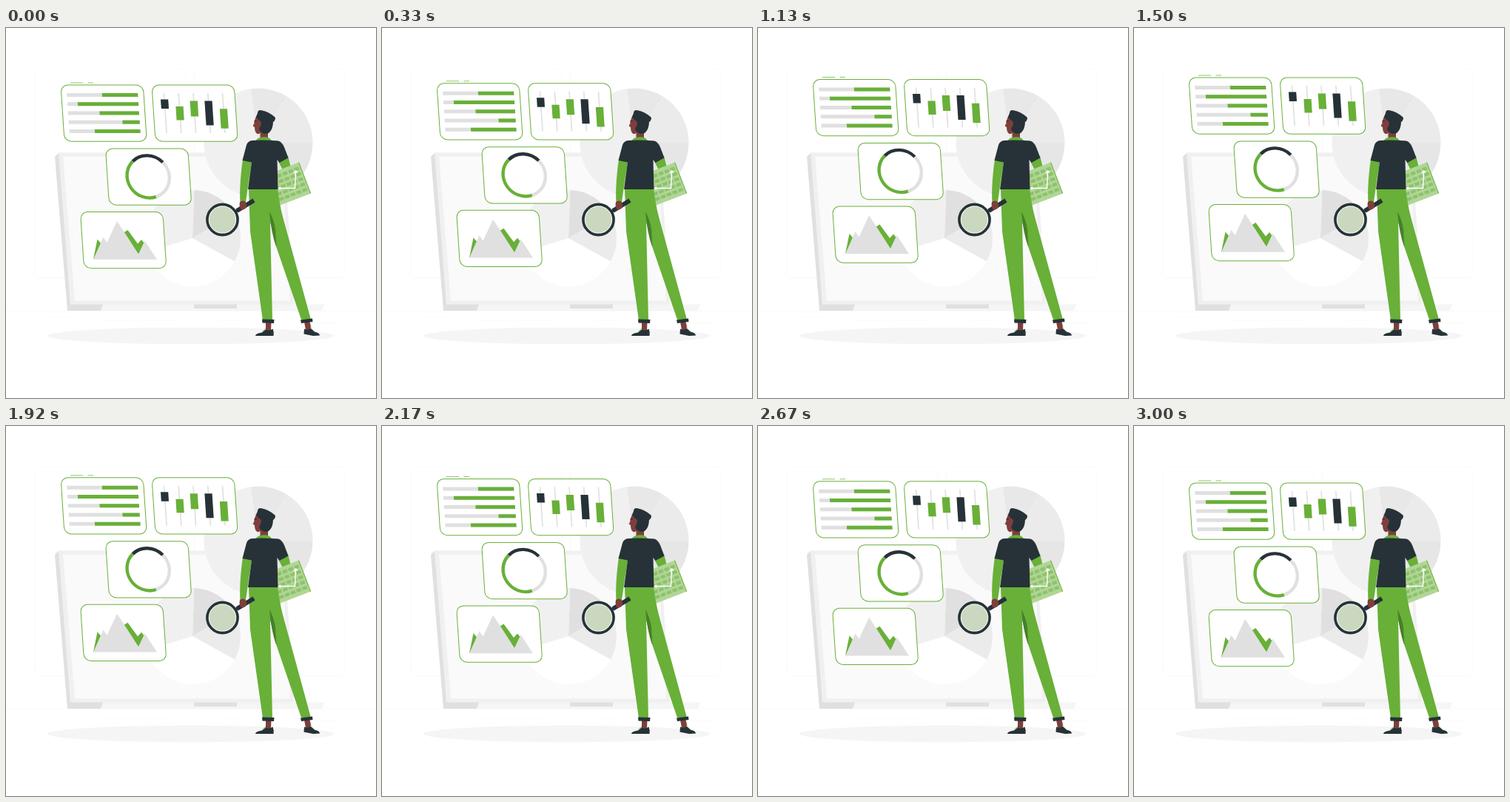
Animation of 500x500 px, one loop 3040 ms. Source, as an HTML page:

```html
<!DOCTYPE html>
<html lang="en">
<head>
<meta charset="utf-8">
<title>Data dashboard</title>
<style>
html, body { margin: 0; width: 100%; height: 100%; overflow: hidden; background: #fff }
svg { display: block; width: 100%; height: 100% }
.green { fill: #68b038 } .dark { fill: #263238 } .skin { fill: #7f3e3b }
.grey { fill: #e0e0e0 } .pale { fill: #f0f0f0 } .light { fill: #fafafa }
.line { fill: none; stroke: #ebebeb; stroke-width: .25 }
.card { fill: #fff; stroke: #68b038 }
.ring { fill: none; stroke-width: 4.4 }
</style>
</head>
<body>
<svg viewBox="0 0 500 500">
  <g class="line">
    <rect x="38.7" y="55.2" width="204" height="282.4" rx="5.7"/>
    <rect x="254.5" y="55.2" width="204" height="282.4" rx="5.7"/>
    <path d="M0 382.5H500M417 398.6H450M397 389.3H416M52 391H95.6M104.6 391H111M131.5 395.3H225M290 395.3H325"/>
  </g>

  <!-- Laptop -->
  <path class="grey" d="M66 174L72 168L89 374L83 382Z"/>
  <path class="pale" d="M71 168.5H376L389 374H87Z"/>
  <path class="light" d="M77 173.5H372L384 368.5H93Z"/>
  <path fill="#f5f5f5" d="M131 373.5H430L427 382H128Z"/>
  <path class="grey" d="M87 373.5H131L128 382H83ZM254 373.5H312V379H256Q254 379 254 377Z"/>
  <g id="pies"></g>
  <ellipse cx="249.5" cy="416" rx="193.9" ry="11.3" fill="#f5f5f5"/>

  <!-- Floating cards -->
  <g id="float">
    <path stroke="#68b038" stroke-width="1.1" opacity=".75" d="M87 74H104M110.5 74H118"/>
    <g id="bars" transform="translate(74 77) skewX(3.76)"></g>
    <g id="candles" transform="translate(197 77) skewX(3.76)"></g>
    <g id="donut" transform="translate(134.5 163) skewX(3.76)"></g>
    <g id="peaks" transform="translate(100.5 248.5) skewX(3.76)"></g>
    <path class="green" d="M118 312.5L123.5 285.5L136 300ZM158 277L164.5 273L178 291.5L183 286L188 292L179 306Z"/>
    <path class="grey" d="M118 312.8L131.5 282.5L136.5 290L150 261L161 277.5L179 305.5L187.5 287.5L204 312.8Z"/>
  </g>

  <!-- Tablet under the arm -->
  <path class="green" d="M368 180L381 173L384.5 187L375 194Z"/>
  <g transform="translate(396 181.5) rotate(-21)">
    <rect x="-48" width="48" height="45" fill="#b0d696"/>
    <g id="cells" fill="#8ec26c"></g>
    <path class="green" d="M-1 0H0V45H-1Z"/>
  </g>
  <path d="M367 217L371 215.5M369 216.5L390.5 216.5L391.5 194M389 196L391.5 193L394 195" fill="none" stroke="#fff" stroke-width="1.4"/>
  <circle cx="370" cy="217" r="1.6" fill="#fff"/>
  <circle cx="391.5" cy="194" r="1.6" fill="#fff"/>

  <!-- Shoes and trousers -->
  <path class="skin" d="M351 397H358.5L358 409H351ZM403 397H410.5L413 408H405Z"/>
  <path fill="#b0d696" d="M345 411L351 405V410ZM411 404L417 410L412 409Z"/>
  <path class="dark" d="M337 416Q337 412.5 346 411.5L351 407.5Q356 410 360.5 406.5Q362.5 411 361.5 416ZM403 406.5Q407 409 411.5 406L417 410.5Q424 412 424 415.5L415 416L402.5 413.5Z"/>
  <path class="green" d="M328 217H367Q370 240 374 255L412 394H399L366 298Q361 278 357 262L360 395H347L330 275Z"/>
  <path fill="#487f28" d="M356 248Q362 259 364 272L365.5 297Q358 276 356 248Z"/>
  <path class="dark" d="M346 393.5L362.5 394L362 399L346.5 398.5ZM398 394.5L414 392.5L414.5 397L399 399Z"/>

  <!-- Head and torso -->
  <path class="skin" d="M338 120Q335 126 335.3 129L333.6 132.4L336 134Q336 141 339.5 143Q342 143.5 343.5 142V149H354V138L350 122Z"/>
  <path class="dark" d="M338 120L361 126Q361 137 355 142Q348 144.5 344 140Q340.5 137 344 131Q345.5 126 341 124ZM335.5 125.5L339 124.5L339.5 125.5L335.5 126.6Z"/>
  <path class="skin" d="M340.5 128Q345 123.5 345 129Q344 135 340.5 136Z"/>
  <path class="dark" d="M340 115Q340 111 344 111Q355 112.5 364 121Q364 125 361 127L337.5 121Z"/>
  <path class="green" d="M337 153Q340 147.5 347 147.5Q356 146.5 359.5 153Z"/>
  <path class="green" d="M320 177L332.5 180L328 207L324 235L316.5 236Q315 213 320 177Z"/>
  <path class="dark" d="M333 152Q346 151 368 152.5Q373 154 376 161L381.5 175.5L369.5 182L366.5 178L367.5 218H327L332 181.5L319.5 179L325 158Q327 152.5 333 152Z"/>

  <!-- Magnifier -->
  <g stroke="#263238">
    <circle cx="292.5" cy="259" r="20.6" fill="#eef3ea" stroke-width="3.6"/>
    <path stroke-width="3.5" d="M309.5 248.5L318 243"/>
    <path stroke-width="6" d="M312 247L335 233"/>
  </g>
  <circle cx="292.5" cy="259" r="17.6" fill="#c9d8bf"/>
  <path class="skin" d="M316 235Q320 232 324 235L325.5 241Q323 246 318 245.5Q314.5 242 316 235Z"/>
</svg>
<script>
const el = id => document.getElementById(id);
const add = (id, markup) => el(id).insertAdjacentHTML('beforeend', markup);
const rect = (x, y, w, h, cls) => `<rect x="${x}" y="${y}" width="${w}" height="${h}" class="${cls}"/>`;
const polar = (x, y, r, deg) => {
  const a = deg * Math.PI / 180;
  return `${x + r * Math.cos(a)} ${y + r * Math.sin(a)}`;
};
const arc = (x, y, r, from, to) =>
  `${polar(x, y, r, from)}A${r} ${r} 0 ${+(to - from > 180)} 1 ${polar(x, y, r, to)}`;
const slice = (x, y, r, from, to, fill) =>
  add('pies', `<path fill="${fill}" d="M${x} ${y}L${arc(x, y, r, from, to)}Z"/>`);

// Each slice ends where the next one starts
function pie(x, y, r, start, parts) {
  for (const [end, fill] of parts) {
    slice(x, y, r, start, end, fill);
    start = end;
  }
}
pie(341, 155, 73.5, 0, [[90, '#e6e6e6'], [262, '#f0f0f0'], [302, '#e8e8e8'], [360, '#ebebeb']]);
pie(252, 284, 65, -88, [[-30, '#e0e0e0'], [29, '#ebebeb'], [163, '#fff'], [272, '#f0f0f0']]);

for (const id of ['bars', 'candles', 'donut', 'peaks'])
  add(id, '<rect width="111.3" height="76.2" rx="9.5" class="card"/>');

[55, 21.3, 50, 80.2, 41.9].forEach((x, i) => {
  const y = 11 + i * 12.27;
  add('bars', rect(7.4, y, 96, 5, 'grey') + rect(x, y, 103.4 - x, 5, 'green'));
});

[[19.5, 12.5, 'dark'], [29, 18.5, 'green'], [21.5, 21, 'green'], [21.5, 33, 'dark'], [32.3, 26.5, 'green']]
  .forEach(([y, h, cls], i) => {
    const x = 15.8 + i * 19.75;
    add('candles', rect(x - .8, 11, 1.6, 54, 'grey') + rect(x - 5.1, y, 10.2, h, cls));
  });

for (const [from, to, color] of [[-43, 72, '#e0e0e0'], [72, 227, '#68b038'], [227, 317, '#263238']])
  add('donut', `<path class="ring" stroke="${color}" d="M${arc(55.2, 38, 28.6, from, to)}"/>`);

for (let row = 0; row < 5; row++)
  for (let col = 0; col < 5; col++)
    add('cells', rect(-9.5 - col * 8.4, 5 + row * 7.6, 6.4, 4.4, ''));

// Rises 10 units and returns at a steady pace, 24 steps per second
const LOOP = 3040, HALF = 36;
function draw(now) {
  const step = Math.floor((now % LOOP) * .024 + .13);
  const lift = 10 * Math.max(0, 1 - Math.abs(1 - step / HALF));
  el('float').setAttribute('transform', `translate(0 ${-lift})`);
  requestAnimationFrame(draw);
}
draw(0);
</script>
</body>
</html>
```
